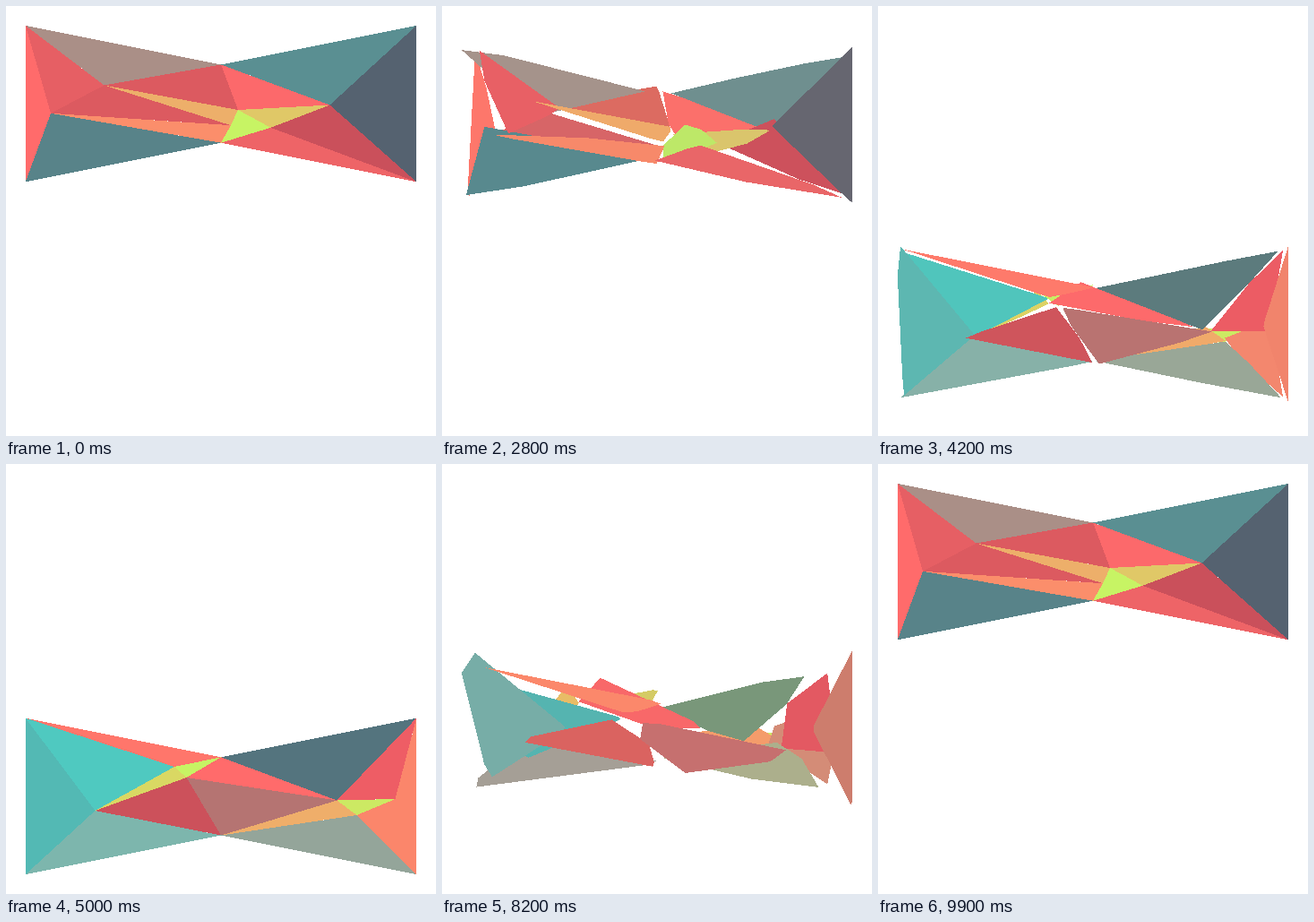
Write an HTML page that moves like this. It is 480x480 px and loops after 10000 ms.

```html
<!DOCTYPE html>
<html>
<head>
<meta charset="utf-8">
<style>
html, body { margin: 0; width: 100%; height: 100%; overflow: hidden; background: #fff; }
svg { display: block; width: 100vw; height: 100vh; }
</style>
</head>
<body>
<svg viewBox="0 0 480 480" shape-rendering="crispEdges"></svg>
<script>
const unit = 480 / 11;
const yScale = 2.5;  // weight of heights when lengths are measured
const size = 50;     // points per outline

// The six outer corners of the bow tie, with its top edge at grid row `row`.
const frame = row => {
  const at = (x, y) => [unit * (x + .5), unit * (y + row + .5)];
  return { a: at(0, 0), b: at(0, 4), c: at(10, 0), d: at(10, 4), e: at(5, 1), f: at(5, 3) };
};
const upper = { ...frame(0), g: [50, 119.8], h: [109.5, 88.5], i: [361.5, 110.5],
  j: [259, 116], k: [295.5, 135.8], l: [251, 133.2] };
const lower = { ...frame(6), g: [99.5, 387], h: [188, 338], i: [201.5, 350],
  j: [369.5, 375.5], k: [434.5, 374], l: [391.5, 392] };

// Triangle and colour above, triangle and colour below; back to front.
const pairs = `
ljf c7f464 jkl cce963
abg ff6b6b hig d9d863
ghl dc5a60 bgf 7db6ad
bgf 588389 ahg 4fc9c0
hej dc5a60 ehi c7f464
ahe aa8f87 abg 53b9b4
eji fc696b jlf efae6a
eci 5a8f92 kld fb866b
kid ca505b cjk ee5d65
cdi 556270 ckd fb866b
jki e0c867 fld 94a59a
fjk c7f464 ecj 54747e
agh e65f64 eij ff6b6b
hlj edaf6a aeh ff766b
glf fb8e6b gif cc515b
fkd ee6467 ifj b57472`.trim().split("\n").map(s => s.split(" "));

const mix = (p, q, k) => p.map((v, i) => v + (q[i] - v) * k);
const dist = (p, q) => Math.hypot(p[0] - q[0], (p[1] - q[1]) * yScale);

// Clockwise outline; each edge gets points in proportion to its length.
function outline(names, points) {
  const ring = [...names].map(n => points[n]);
  const [p, q, r] = ring;
  if ((q[0] - p[0]) * (r[1] - p[1]) < (q[1] - p[1]) * (r[0] - p[0])) ring.reverse();
  const edges = ring.map((p, i) => [p, ring[(i + 1) % 3]]);
  const total = edges.reduce((s, [p, q]) => s + dist(p, q), 0);
  let run = 0;
  return edges.flatMap(([p, q]) => {
    const before = Math.round(run / total * (size - 3));
    run += dist(p, q);
    const n = Math.round(run / total * (size - 3)) - before + 1;
    return Array.from({ length: n }, (_, k) => mix(p, q, k / n));
  });
}

// Rotate the ring so that the points travel as little as possible.
function align(ring, goal) {
  let best = 0, least = Infinity;
  for (let o = 0; o < size; o++) {
    const sum = goal.reduce((s, p, i) => s + dist(ring[(o + i) % size], p) ** 2, 0);
    if (sum < least) { least = sum; best = o; }
  }
  return [...ring.slice(best), ...ring.slice(0, best)];
}

// Colours blend in CIE Lab space, kept as the cube roots of X, Y and Z.
const white = [.9505, 1, 1.089];
const dot = (m, v) => m.map(row => row.reduce((s, c, i) => s + c * v[i], 0));
const toXYZ = [[.4124, .3576, .1805], [.2126, .7152, .0722], [.0193, .1192, .9505]];
const fromXYZ = [[3.2406, -1.5372, -.4986], [-.9689, 1.8758, .0415], [.0557, -.204, 1.057]];
function hexToLab(hex) {
  const linear = [0, 2, 4].map(i => {
    const v = parseInt(hex.slice(i, i + 2), 16) / 255;
    return ((v + .055) / 1.055) ** 2.4;
  });
  return dot(toXYZ, linear).map((v, i) => Math.cbrt(v / white[i]));
}
function labToCss(lab) {
  const rgb = dot(fromXYZ, lab.map((v, i) => v ** 3 * white[i]));
  return `rgb(${rgb.map(v => Math.round(255 * (1.055 * Math.max(v, 0) ** (1 / 2.4) - .055)))})`;
}

const svg = document.querySelector("svg");
const shapes = pairs.map(([nameA, colA, nameB, colB]) => {
  const to = outline(nameB, lower), from = align(outline(nameA, upper), to);
  const el = svg.appendChild(document.createElementNS(svg.namespaceURI, "polygon"));
  return { el, from, to, colA: hexToLab(colA), colB: hexToLab(colB) };
});

function ease(u) {
  u = Math.min(1, Math.max(0, u));
  return u < .5 ? 4 * u ** 3 : 1 - 4 * (1 - u) ** 3;
}

function draw(now) {
  const t = now % 10000;
  const k = ease((t - 1950) / 3000) - ease((t - 6950) / 3000);
  for (const s of shapes) {
    s.el.setAttribute("points", s.from.map((p, i) => mix(p, s.to[i], k).map(v => v.toFixed(2))).join(" "));
    s.el.setAttribute("fill", labToCss(mix(s.colA, s.colB, k)));
  }
}

const start = performance.now();
function tick() {
  draw(performance.now() - start);
  requestAnimationFrame(tick);
}
tick();
</script>
</body>
</html>
```
